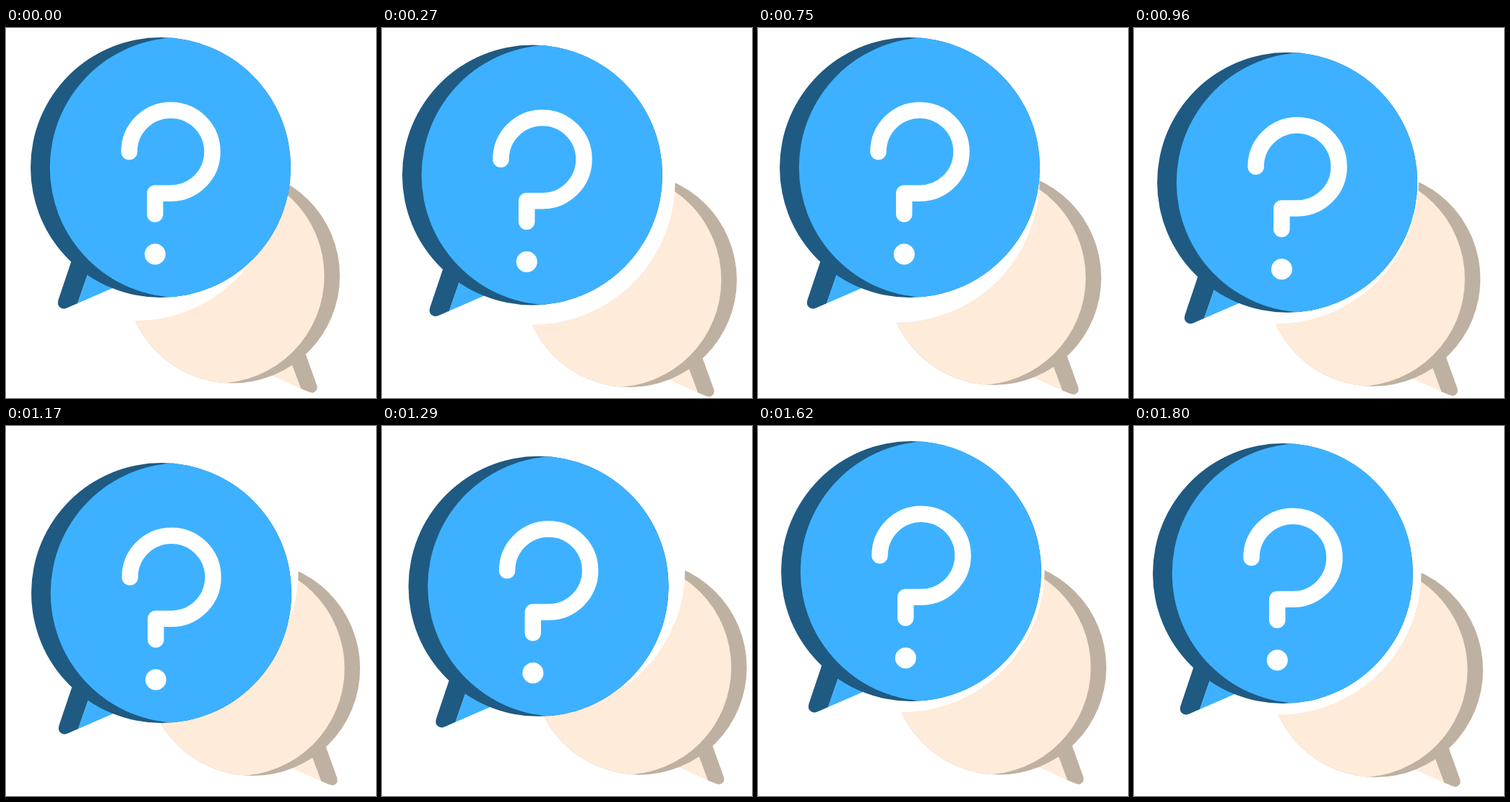
Animation, 512 px wide and 512 px high, one loop 1830 ms. Source, as an HTML page:

```html
<!DOCTYPE html>
<html lang="en">
<head>
<meta charset="utf-8">
<title>Question bubbles</title>
<style>
  html, body { margin: 0; width: 100%; height: 100%; overflow: hidden; background: #fff; }
  svg { display: block; width: 100vw; height: 100vh; }
</style>
</head>
<body>
<svg viewBox="0 0 512 512">
  <defs>
    <clipPath id="askDisc"><circle cx="214" cy="193" r="180"/></clipPath>
    <clipPath id="replyDisc"><circle cx="313.5" cy="343" r="148.5"/></clipPath>
    <mask id="notch" maskUnits="userSpaceOnUse" x="100" y="150" width="400" height="400">
      <rect x="100" y="150" width="400" height="400" fill="#fff"/>
      <circle cx="179" cy="207.5" r="197.5" fill="#000"/>
    </mask>
  </defs>

  <g id="reply">
    <path fill="#bfb1a1" d="M412 444 L430 494 Q432 500 428 503 Q425 506 419 503.5 L408 499 L392 456 Z"/>
    <path fill="#ffebd9" d="M392 456 L408 499 L366 480 Z"/>
    <g mask="url(#notch)">
      <circle cx="313.5" cy="343" r="148.5" fill="#bfb1a1"/>
      <circle cx="292" cy="343" r="148.5" fill="#ffebd9" clip-path="url(#replyDisc)"/>
    </g>
  </g>

  <g id="ask">
    <path fill="#1f5a82" d="M92 318 L72.5 376 Q70.5 382.5 74 386 Q78 390 84 387.5 L99 381 L116 332 Z"/>
    <path fill="#3db1ff" d="M116 332 L99 381 L152 358 Z"/>
    <circle cx="214" cy="193" r="180" fill="#1f5a82"/>
    <circle cx="240.7" cy="193" r="180" fill="#3db1ff" clip-path="url(#askDisc)"/>
    <path d="M170.5 171.2 A57.5 57.5 0 1 1 228 228.7 H206.2 V257.5"
      fill="none" stroke="#fff" stroke-width="22.5" stroke-linecap="round" stroke-linejoin="round"/>
    <circle cx="206.3" cy="313" r="14.5" fill="#fff"/>
  </g>
</svg>
<script>
const LOOP = 1830, STEP = 30;

// Key points of each drift: time, x, y
const drifts = {
  ask: [[0, 0, 0], [270, -6, 10.5], [510, -1, 7], [750, -4, 0], [1170, 1, 38],
    [1440, 3.4, 10], [1620, -2, 8], [1720, -19, 9], [1800, -8, 11]],
  reply: [[0, 0, 0], [270, 29, 5.5], [510, 22, -2], [750, 13, 2.5], [870, 14, 8],
    [1170, 28, -7.5], [1310, 44, -9], [1440, 37, -10.5], [1620, 20, -9], [1800, 21, -5.5]]
};

// Smooth curve through the keys; each tangent follows the neighbouring keys
function valueAt(keys, axis, t) {
  const last = keys.length - 1;
  const tangent = i => {
    const a = keys[Math.max(i - 1, 0)], b = keys[Math.min(i + 1, last)];
    return (b[axis] - a[axis]) / (b[0] - a[0]);
  };
  const next = keys.findIndex(key => key[0] > t);
  const i = next < 0 ? last - 1 : next - 1;
  const from = keys[i], to = keys[i + 1];
  const span = to[0] - from[0], u = (t - from[0]) / span, w = 1 - u;
  return w * w * (1 + 2 * u) * from[axis] + u * u * (3 - 2 * u) * to[axis]
    + span * u * w * (w * tangent(i) - u * tangent(i + 1));
}

function draw() {
  const t = Math.floor(performance.now() % LOOP / STEP) * STEP;
  for (const [id, keys] of Object.entries(drifts)) {
    const [x, y] = [1, 2].map(axis => valueAt(keys, axis, t).toFixed(2));
    document.getElementById(id).setAttribute('transform', `translate(${x} ${y})`);
  }
  requestAnimationFrame(draw);
}
draw();
</script>
</body>
</html>
```
